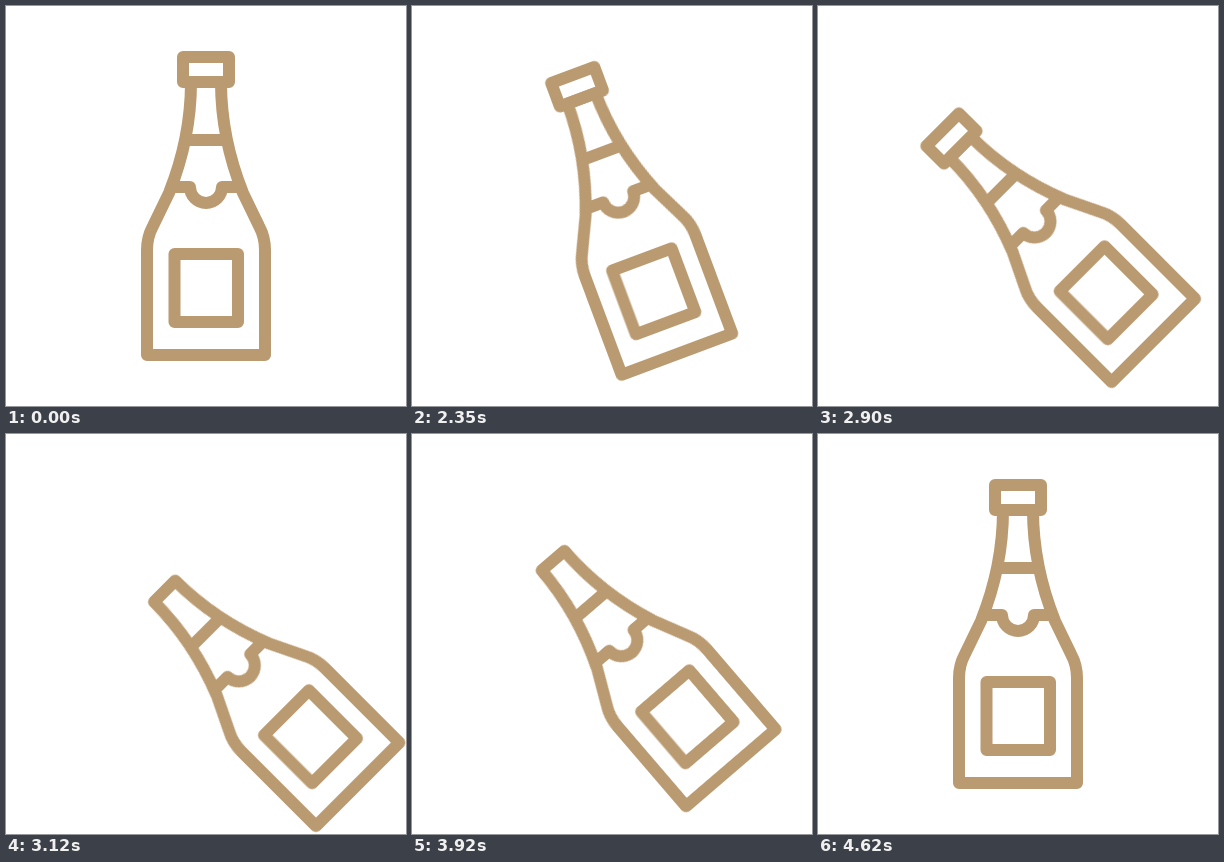
These frames come from a looping animation (400 by 400 pixels, 4.65 s). An HTML page without scripts:

```html
<!DOCTYPE html>
<html lang="en">
<head>
<meta charset="utf-8">
<title>Popping bottle</title>
<style>
  html, body { margin: 0; width: 100%; height: 100%; overflow: hidden; background: #fff; }
  svg { display: block; width: 100%; height: 100%; }

  .bottle {
    fill: none;
    stroke: #ba9a70;
    stroke-width: 12;
    stroke-linecap: round;
    stroke-linejoin: round;
    transform-origin: 200px 200px;
    animation: tilt 4650ms linear infinite;
  }
  .cork {
    x: 177px; y: 51px; width: 46px; height: 25px;
    animation: pop 4650ms linear infinite;
  }

  @keyframes tilt {
    /* lean over */
    0%, 43.01% { transform: translate(0, 0) rotate(0deg); }
    43.44% { transform: translate(.2px, 1.3px) rotate(-.15deg); }
    46.24% { transform: translate(3px, -2.5px) rotate(-6deg); }
    48.39% { transform: translate(7px, 1px) rotate(-12.5deg); }
    50.54% { transform: translate(12.8px, 8.5px) rotate(-20.4deg); }
    54.19% { transform: translate(19.3px, 22px) rotate(-33.6deg); }
    57.2% { transform: translate(26px, 27.5px) rotate(-41.5deg); }
    /* recoil */
    61.29%, 62.58% {
      transform: translate(30px, 29px) rotate(-45deg);
      animation-timing-function: ease-out;
    }
    66.24% { transform: translate(47px, 46px) rotate(-45deg); }
    74.19% { transform: translate(41px, 36.5px) rotate(-45deg); }
    77.85% { transform: translate(36px, 32px) rotate(-45deg); }
    /* swing back past upright, then settle */
    82.8% { transform: translate(27px, 25px) rotate(-43deg); }
    86.02% { transform: translate(16px, 16px) rotate(-38deg); }
    88.17% { transform: translate(9px, 10px) rotate(-31deg); }
    89.68% { transform: translate(4.5px, 5px) rotate(-22deg); }
    90.32% { transform: translate(4px, 3px) rotate(-15.3deg); }
    91.83% { transform: translate(1px, 2px) rotate(-3deg); }
    93.12% { transform: translate(0, 1px) rotate(5deg); }
    94.41% { transform: translate(0, .5px) rotate(7deg); animation-timing-function: ease-in-out; }
    99.25%, 100% { transform: translate(0, 0) rotate(0deg); }
  }

  @keyframes pop {
    0%, 62.58% {
      x: 177px; y: 51px; width: 46px; height: 25px; opacity: 1;
      animation-timing-function: cubic-bezier(.2, .5, .6, 1);
    }
    66.02% { x: 177px; y: -115px; width: 46px; height: 25px; opacity: 1; }
    66.88% {
      x: 177px; y: -125px; width: 46px; height: 25px; opacity: 0;
      animation-timing-function: step-end;
    }
    /* a new cork grows out of the rim */
    89.57% { x: 185px; y: 76px; width: 30px; height: 0; opacity: 1; }
    90.32% { x: 184.5px; y: 69px; width: 31px; height: 7px; opacity: 1; }
    92.26%, 100% { x: 177px; y: 51px; width: 46px; height: 25px; opacity: 1; }
  }
</style>
</head>
<body>
<svg viewBox="0 0 400 400">
  <g class="bottle">
    <path d="M185 76C185 112 177 152 163 187L147 220Q141 231 141 244V349H259V244Q259 231 253 220L237 187C223 152 215 112 215 76Z"/>
    <path d="M181 134H219"/>
    <path d="M167 181H184A16 16 0 0 0 216 181H233"/>
    <rect x="168.5" y="248" width="63.5" height="68"/>
    <rect class="cork"/>
  </g>
</svg>
</body>
</html>
```
